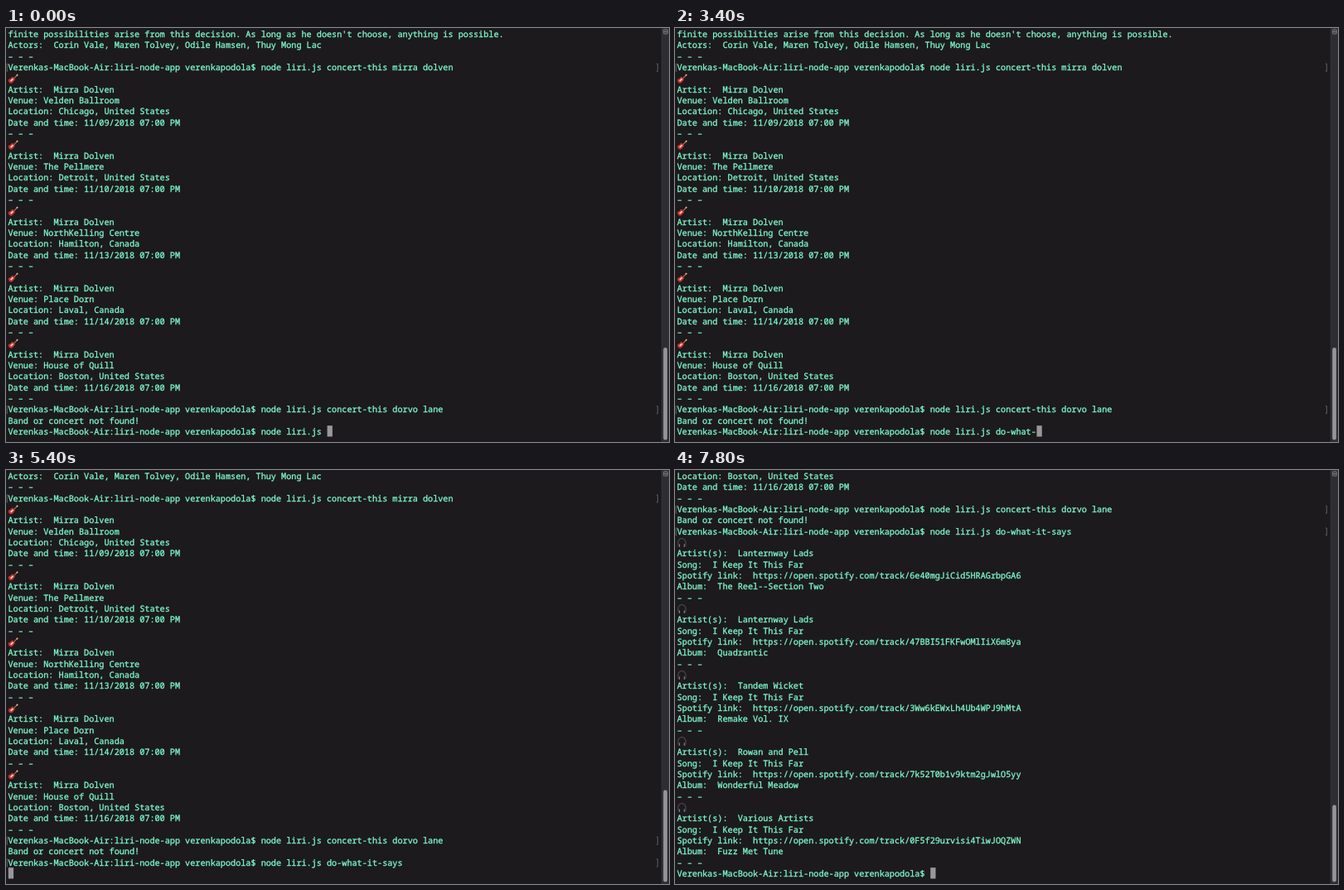
An HTML page that plays this animation: 800 px wide and 500 px high, repeating every 8 s.

```html
<!DOCTYPE html>
<html lang="en">
<head>
<meta charset="utf-8">
<title>Terminal</title>
<style>
  html, body { margin: 0; width: 100%; height: 100%; overflow: hidden; background: #1c1a1d; }
  svg { display: block; width: 100vw; height: 100vh; }
  text {
    font: 500 10.18px "Noto Sans Mono", "DejaVu Sans Mono", monospace;
    fill: #7dfbcb; stroke: #7dfbcb; stroke-width: .3px;
    white-space: pre; text-rendering: geometricPrecision;
  }
</style>
</head>
<body>
<svg viewBox="0 0 800 500" xmlns="http://www.w3.org/2000/svg">
  <defs>
    <g id="guitar">
      <path d="M7 6.6 11.2 2.4" stroke="#a5653f" stroke-width="1.3"/>
      <path d="M10.6 3 12 1.5" stroke="#d8b48c" stroke-width="1.7"/>
      <path d="M.6 8.4C.8 6.6 2.8 7 3.8 5.8 4.8 4 6.6 4 6.8 5.4 7.2 6.4 8.8 6.4 8.6 7.8 8.2 9 7.2 9 6.8 10.2 5.6 13.2 .4 12.4 .6 8.4Z" fill="#c8322f"/>
      <path d="M3.4 9.6 6.4 6.8" stroke="#f3d9d2" stroke-width="1.7"/>
    </g>
    <g id="phones" fill="none">
      <path d="M1.4 9.6C-.2 -1.4 12.4 -1.4 10.8 9.6" stroke="#454347" stroke-width="1.3"/>
      <path d="M3.1 8.2v3.6M9.1 8.2v3.6" stroke="#8b898c" stroke-width="1.2"/>
      <path d="M1.9 8.4v3M10.3 8.4v3" stroke="#38363a" stroke-width="1.4"/>
    </g>
    <path id="marks" d="M2.2 2H1.2V11H2.2M785 2h1.3V11H785" fill="none" stroke="#737176" stroke-width=".8"/>
  </defs>
  <rect width="800" height="500" fill="#1c1a1d"/>
  <g id="screen"></g>
  <rect id="cursor" width="6.3" height="13.3" fill="#99979a"/>
  <rect x="791" width="9" height="500" fill="#2e2e32"/>
  <path d="M791.2 0V500" stroke="#3b393d" stroke-width=".6"/>
  <rect x="793.4" y="1.8" width="5" height="5.4" rx=".8" fill="#47454a" stroke="#8a888d" stroke-width=".7"/>
  <path d="M793.6 4.5h4.6" stroke="#8a888d" stroke-width=".7"/>
  <rect id="thumb" x="793.2" width="4.7" rx="2.3" fill="#96949a"/>
</svg>
<script>
const LOOP = 8000, ENTER = 5400, RESULT = 7000;
const ROWS = 37, PITCH = 40 / 3, CELL = 6.108, LEFT = 2.5;
const PROMPT = 'Verenkas-MacBook-Air:liri-node-app verenkapodola$ ';
const RULE = '– – –';
const COMMAND = 'do-what-it-says';
const KEYS = [600, 800, 1200, 1600, 1800, 2000, 2200, 2800, 3600, 3800, 4200, 4400, 4600, 4800, 5000];

const $ = id => document.getElementById(id);
const line = (text, icon) => ({ text, icon });
const run = args => line(PROMPT + 'node liri.js ' + args, 'marks');

const concert = ([venue, place, day]) => [
  line('', 'guitar'),
  line('Artist:  Mirra Dolven'),
  line('Venue: ' + venue),
  line('Location: ' + place),
  line(`Date and time: 11/${day}/2018 07:00 PM`),
  line(RULE)
];

const song = ([artist, track, album]) => [
  line('', 'phones'),
  line('Artist(s):  ' + artist),
  line('Song:  I Keep It This Far'),
  line('Spotify link:  https://open.spotify.com/track/' + track),
  line('Album:  ' + album),
  line(RULE)
];

const history = [
  line("finite possibilities arise from this decision. As long as he doesn't choose, anything is possible."),
  line('Actors:  Corin Vale, Maren Tolvey, Odile Hamsen, Thuy Mong Lac'),
  line(RULE),
  run('concert-this mirra dolven'),
  ...[
    ['Velden Ballroom', 'Chicago, United States', '09'],
    ['The Pellmere', 'Detroit, United States', '10'],
    ['NorthKelling Centre', 'Hamilton, Canada', '13'],
    ['Place Dorn', 'Laval, Canada', '14'],
    ['House of Quill', 'Boston, United States', '16']
  ].flatMap(concert),
  run('concert-this dorvo lane'),
  line('Band or concert not found!')
];

const results = [
  ['Lanternway Lads', '6e40mgJiCid5HRAGrbpGA6', 'The Reel--Section Two'],
  ['Lanternway Lads', '47BBI51FKFwOMlIiX6m8ya', 'Quadrantic'],
  ['Tandem Wicket', '3Ww6kEWxLh4Ub4WPJ9hMtA', 'Remake Vol. IX'],
  ['Rowan and Pell', '7k52T0b1v9ktm2gJwlO5yy', 'Wonderful Meadow'],
  ['Various Artists', '0F5f29urvisi4TiwJOQZWN', 'Fuzz Met Tune']
].flatMap(song);

function linesAt(t) {
  if (t < ENTER) {
    const typed = KEYS.filter(k => k <= t).length;
    return [...history, line(run(COMMAND.slice(0, typed)).text)];
  }
  const sent = [...history, run(COMMAND)];
  return t < RESULT ? [...sent, line('')] : [...sent, ...results, line(PROMPT)];
}

function add(tag, attrs, text = '') {
  const el = document.createElementNS('http://www.w3.org/2000/svg', tag);
  for (const name in attrs) el.setAttribute(name, attrs[name]);
  el.textContent = text;
  $('screen').append(el);
}

let shown = '';
function draw(t) {
  const lines = linesAt(t);
  const last = lines[lines.length - 1].text;
  const key = lines.length + last;
  if (key === shown) return;
  shown = key;

  const scroll = lines.length - ROWS;
  $('screen').replaceChildren();
  lines.slice(scroll).forEach(({ text, icon }, i) => {
    const y = i * PITCH;
    if (icon) add('use', { href: '#' + icon, x: icon === 'marks' ? 0 : LEFT - .3, y: y + 1.3 });
    if (text) add('text', { x: LEFT, y: y + 11.1 }, text);
  });

  $('cursor').setAttribute('x', LEFT + last.length * CELL + .3);
  $('cursor').setAttribute('y', (ROWS - 1) * PITCH + .2);
  const top = 386 + scroll * .6;
  $('thumb').setAttribute('y', top);
  $('thumb').setAttribute('height', 497.5 - top);
}

const start = performance.now();
function tick() {
  draw((performance.now() - start) % LOOP);
  requestAnimationFrame(tick);
}
tick();
</script>
</body>
</html>
```
